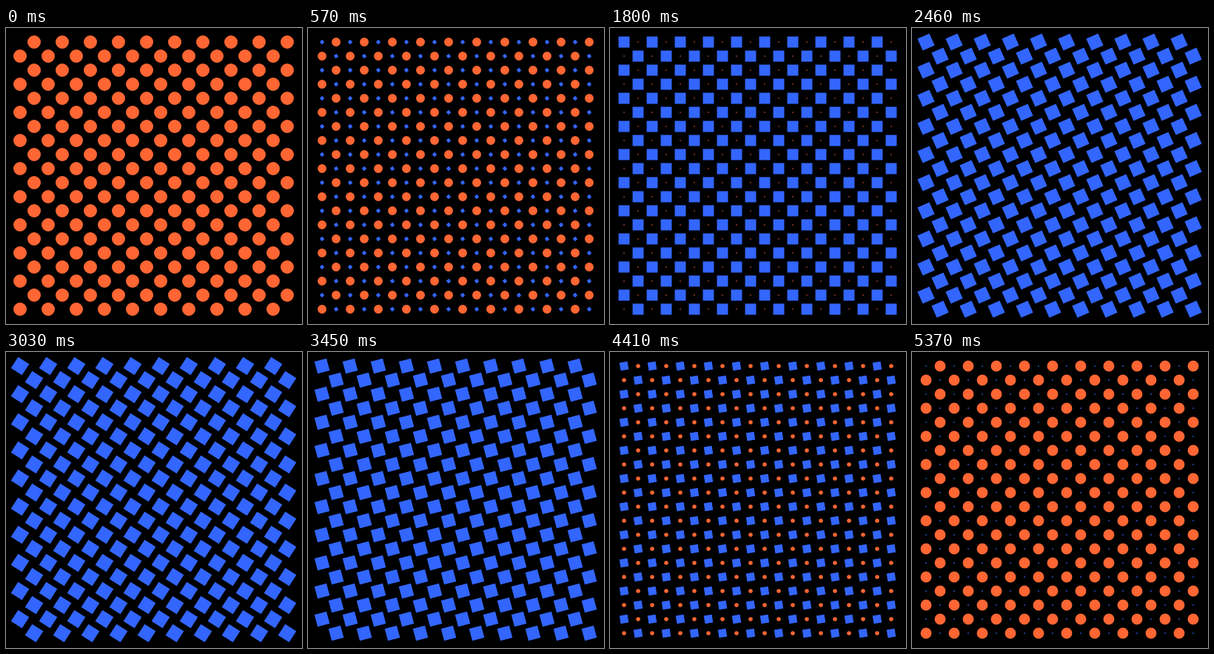
An HTML page with a canvas that plays this animation: 400x400 px, repeating every 5400 ms.

```html
<!DOCTYPE html>
<html lang="en">
<head>
<meta charset="utf-8">
<title>Dots and squares</title>
<style>
  html, body { margin: 0; width: 100%; height: 100%; overflow: hidden; background: #000; }
  canvas { display: block; width: 400px; height: 400px; }
</style>
</head>
<body>
<canvas id="stage" width="400" height="400"></canvas>
<script>
const ctx = document.getElementById('stage').getContext('2d');
const SIZE = 400, COUNT = 20, PITCH = 19, LOOP = 5400, STEP = 30;
const FULL = 19.5, GAP = 1.5;
const ORANGE = '#ff6633', BLUE = '#3366ff';

function dot(x, y, d) {
  ctx.moveTo(x + d / 2, y);
  ctx.arc(x, y, d / 2, 0, Math.PI * 2);
}

function square(x, y, side, angle) {
  const c = side / 2 * Math.cos(angle), s = side / 2 * Math.sin(angle);
  ctx.moveTo(x + c - s, y + s + c);
  ctx.lineTo(x - c - s, y - s + c);
  ctx.lineTo(x - c + s, y - s - c);
  ctx.lineTo(x + c + s, y + s - c);
  ctx.closePath();
}

// Fills every second cell of the grid, like one colour of a chessboard.
function fillCells(parity, color, shape) {
  ctx.beginPath();
  for (let row = 1; row <= COUNT; row++) {
    for (let col = 1; col <= COUNT; col++) {
      if ((row + col) % 2 === parity) shape(col * PITCH, row * PITCH);
    }
  }
  ctx.fillStyle = color;
  ctx.fill();
}

function draw(t) {
  const wave = Math.sin(t / 1800);
  const side = FULL * wave - GAP;
  const diameter = FULL * (1 - wave) - GAP;
  const angle = t / 10 * Math.PI / 180;

  ctx.fillStyle = '#000';
  ctx.fillRect(0, 0, SIZE, SIZE);
  if (diameter > 0) fillCells(1, ORANGE, (x, y) => dot(x, y, diameter));
  if (side > 0) fillCells(0, BLUE, (x, y) => square(x, y, side, angle));
}

const start = performance.now();
function tick() {
  const t = (performance.now() - start) % LOOP;
  draw(Math.floor(t / STEP) * STEP);
  requestAnimationFrame(tick);
}
tick();
</script>
</body>
</html>
```
